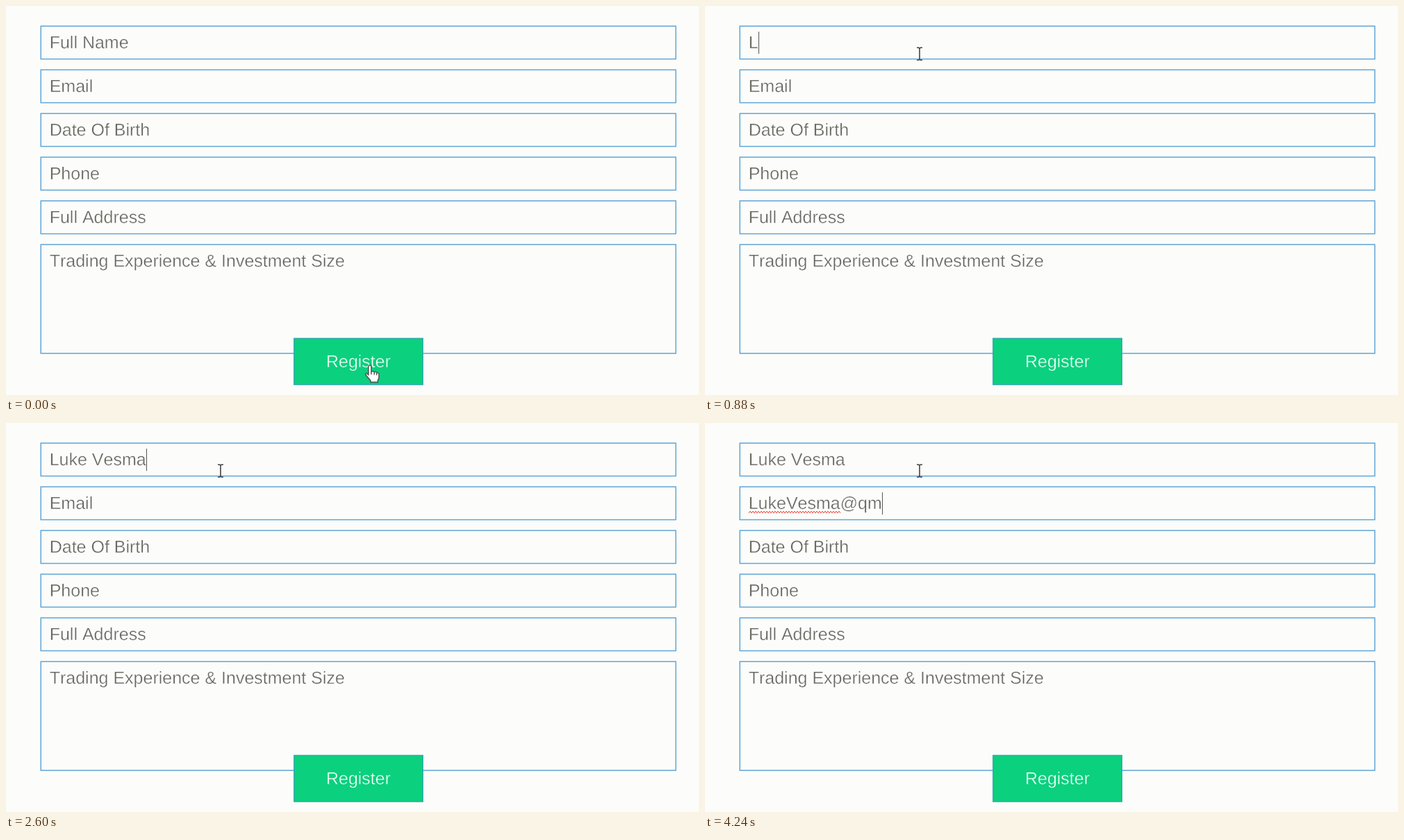
These frames come from a looping animation (998 by 561 pixels, 4.28 s). An HTML page:

```html
<!DOCTYPE html>
<html lang="en">
<head>
<meta charset="utf-8">
<title>Registration form</title>
<style>
  :root { --paper: #fcfdfa; --green: #0bd07e; }
  html, body { margin: 0; width: 100%; height: 100%; overflow: hidden; background: var(--paper); }
  #stage {
    position: relative; width: 998px; height: 561px; overflow: hidden;
    font: 25px/46px "Liberation Sans", Arial, sans-serif; color: #666660;
    font-kerning: none; text-rendering: geometricPrecision;
    -webkit-text-stroke: .4px var(--paper);
  }
  .field, .button { position: absolute; }
  .field { left: 62.7px; height: 46px; white-space: pre; }
  .button {
    left: 415px; top: 480px; width: 185px; line-height: 66px; text-align: center;
    color: #f0fff8; -webkit-text-stroke-color: var(--green);
  }
  .caret { position: absolute; top: 7px; width: 1px; height: 32px; background: #555; visibility: hidden; }
  svg { position: absolute; overflow: visible; fill: none; }
  #frames { left: 0; top: 0; width: 998px; height: 561px; stroke: #5fa5d8; stroke-width: 1.5; }
  #plate { fill: var(--green); stroke: #2fa9ac; }
  #wave { left: 63px; top: 127px; width: 132px; height: 3px; stroke: #f0483e; visibility: hidden; }
  #pointer { left: 0; top: 0; width: 1px; height: 1px; animation: move 4280ms infinite; }
  #hand { fill: #fff; stroke: #444; stroke-width: 1.3; animation: hand 4280ms step-end infinite; }
  #beam { stroke: #444; stroke-width: 1.6; animation: beam 4280ms step-end infinite; }
  @keyframes move {
    0%, .93% { transform: translate(524px, 518.5px); animation-timing-function: cubic-bezier(.4, 0, .6, 1); }
    6.54% { transform: translate(354px, 123px); animation-timing-function: ease-out; }
    11.2%, 100% { transform: translate(309px, 69px); }
  }
  @keyframes hand { 0% { opacity: 1 } 2.6%, 100% { opacity: 0 } }
  @keyframes beam { 0% { opacity: 0 } 2.6%, 100% { opacity: 1 } }
</style>
</head>
<body>
<div id="stage">
  <svg id="frames">
    <path/>
    <rect id="plate" x="414.9" y="479.4" width="185.4" height="66.6"/>
  </svg>
  <div class="button">Register</div>
  <svg id="wave"><path/></svg>
  <svg id="pointer">
    <g id="hand">
      <path d="M-2 2Q-2-.5 .1-.5Q2-.5 2 2V9Q5 7.5 6.5 9.5Q9 8.5 10 10.5Q13 10 13 13V17Q13 19 11.5 21V24H1V21.5Q-3 17-6 13.5Q-7 11-4.5 11.5L-2 13.5Z"/>
      <path d="M2 9v4M6.3 10v3.5M9.8 11v3"/>
    </g>
    <path id="beam" d="M-4-9h2.5L0-8L1.5-9H4M0-8V8M-4 9h2.5L0 8L1.5 9H4"/>
  </svg>
</div>
<script>
  const LOOP = 4280, STEP = 40, BLINK = 500, PITCH = 63;
  const labels = ['Full Name', 'Email', 'Date Of Birth', 'Phone', 'Full Address',
    'Trading Experience & Investment Size'];

  // time, field, text after the key press
  const keys = [
    [600, 0, ''],
    [840, 0, 'L'], [960, 0, 'Lu'], [1040, 0, 'Luk'], [1120, 0, 'Luke'], [1240, 0, 'Luke '],
    [1320, 0, 'Luke V'], [1400, 0, 'Luke Ve'], [1480, 0, 'Luke Ves'], [1520, 0, 'Luke Vesa'],
    [2120, 0, 'Luke Ves'], [2280, 0, 'Luke Vesm'], [2400, 0, 'Luke Vesma'],
    [2640, 1, ''],
    [2800, 1, 'L'], [2920, 1, 'Lu'], [3040, 1, 'Luk'], [3120, 1, 'Luke'], [3320, 1, 'LukeV'],
    [3440, 1, 'LukeVe'], [3520, 1, 'LukeVes'], [3640, 1, 'LukeVesm'], [3760, 1, 'LukeVesma'],
    [3960, 1, 'LukeVesma@'], [4080, 1, 'LukeVesma@q'], [4200, 1, 'LukeVesma@qm']
  ];

  const stage = document.getElementById('stage');
  const wave = document.getElementById('wave');
  wave.firstElementChild.setAttribute('d', 'M0 3' + 'l2-3l2 3'.repeat(33));

  const outline = labels.map((_, i) =>
    `M50.2 ${29 + PITCH * i}H964.6v${i === 5 ? 157 : 47.6}H50.2Z`);
  document.querySelector('#frames path').setAttribute('d', outline.join(''));

  function add(tag, parent, className, text = '') {
    const el = document.createElement(tag);
    el.className = className;
    el.textContent = text;
    parent.append(el);
    return el;
  }

  const fields = labels.map((label, i) => {
    const box = add('div', stage, 'field');
    box.style.top = 30 + PITCH * i + 'px';
    wave.before(box);
    return {
      typed: add('span', box, 'typed'),
      caret: add('i', box, 'caret'),
      hint: add('span', box, 'hint', label)
    };
  });

  function render(t) {
    const values = labels.map(() => '');
    let focus = -1, last = 0;
    for (const [time, field, text] of keys) {
      if (time > t) break;
      values[field] = text;
      focus = field;
      last = time;
    }
    const lit = Math.floor((t - last) / BLINK) % 2 === 0;
    fields.forEach((f, i) => {
      f.typed.textContent = values[i];
      f.hint.style.display = values[i] ? 'none' : '';
      f.caret.style.visibility = i === focus && lit ? 'visible' : 'hidden';
    });
    wave.style.visibility = values[1].includes('@') ? 'visible' : 'hidden';
  }

  let start;
  function tick(now) {
    start ??= now;
    render(Math.floor((now - start) % LOOP / STEP) * STEP);
    requestAnimationFrame(tick);
  }
  render(0);
  requestAnimationFrame(tick);
</script>
</body>
</html>
```
